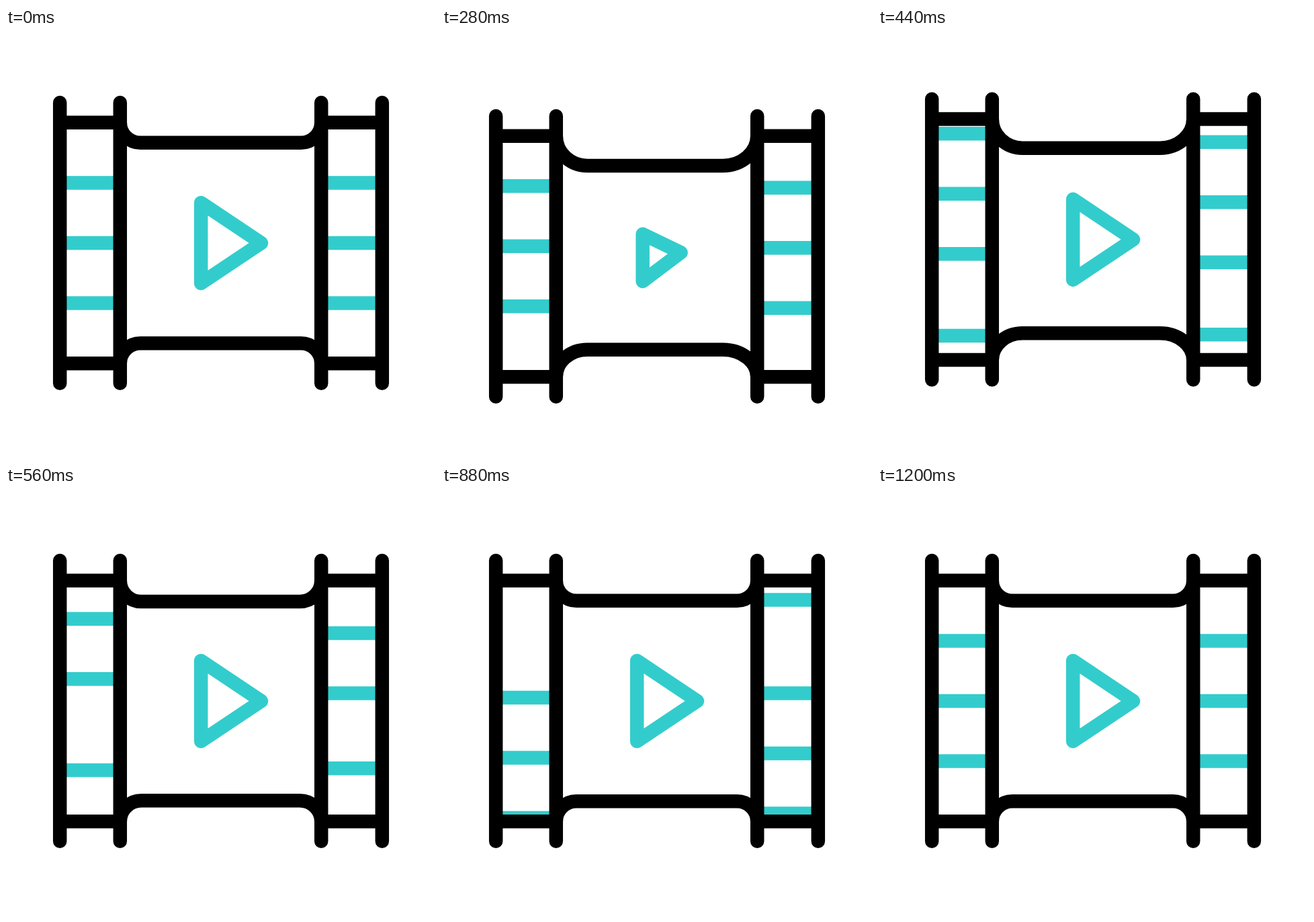
These frames come from a looping animation (640 px wide and 640 px high, 1480 ms). An HTML page:

```html
<!DOCTYPE html>
<html lang="en">
<head>
<meta charset="utf-8">
<title>Film strip</title>
<style>
  html, body { margin: 0; width: 100%; height: 100%; overflow: hidden; background: #fff; }
  svg { display: block; width: 100vw; height: 100vh; }
  path { fill: none; stroke: #000; stroke-width: 20.5; }
  .teal { stroke: #3cc; }
  .round { stroke-linecap: round; stroke-linejoin: round; }
</style>
</head>
<body>
<svg viewBox="0 0 640 640">
  <defs>
    <clipPath id="windows"><path d="M80 141H170V499H80ZM469 141H560V499H469Z"/></clipPath>
  </defs>
  <g id="body">
    <path class="teal" id="bars" clip-path="url(#windows)"/>
    <path id="edges"/>
    <path d="M80.2 140.8H169.8M80.2 499.3H169.8M469.2 140.8H559.8M469.2 499.3H559.8"/>
    <path class="round" d="M80.2 111V528.8M169.8 111V528.8M469.2 111V528.8M559.8 111V528.8"/>
    <path class="teal round" id="play"/>
  </g>
</svg>
<script>
const LOOP = 1480, STEP = 40;
const $ = id => document.getElementById(id);

// 0 to 1 over a span of time; soft = 0 is linear, soft = 1 is a full ease in and out
function ramp(t, start, length, soft = 1) {
  const x = Math.min(1, Math.max(0, (t - start) / length));
  return x + soft * (x * x * (3 - 2 * x) - x);
}

// Three bars, one hole apart
const bars = (x, dy) =>
  [-1, 0, 1].map(i => `M${x} ${320 + 89.5 * i + dy}h91`).join("");

// Film edge curling in from the rails; dir points towards the middle
function edge(y, dir, ry, pinch) {
  const rl = 30 + 1.17 * pinch, rr = 30 + 1.5 * pinch;
  const sweep = dir > 0 ? 0 : 1;
  return `M169.8 ${y}A${rl} ${ry} 0 0 ${sweep} ${169.8 + rl} ${y + dir * ry}`
    + `H${469.2 - rr}A${rr} ${ry} 0 0 ${sweep} 469.2 ${y}`;
}

function draw(t) {
  // Dip, jump past the rest height, settle
  const lift = 20 * ramp(t, 120, 160) - 27 * ramp(t, 280, 120) + 7 * ramp(t, 400, 120);
  $("body").setAttribute("transform", `translate(0 ${lift})`);

  // On each side one set of bars leaves upwards while the next comes in from below
  $("bars").setAttribute("d",
    bars(80, -315 * ramp(t, 152, 960))
    + bars(80, 330 * (1 - ramp(t, 80, 1120, .34)))
    + bars(469, -342 * ramp(t, 146, 1150))
    + bars(469, 322 * (1 - ramp(t, 80, 1120, .5))));

  const pinch = 17.6 * (ramp(t, 80, 280) - ramp(t, 360, 240));
  $("edges").setAttribute("d",
    edge(140.8, 1, 30 + pinch, pinch) + edge(499.3, -1, 30 + .75 * pinch, pinch));

  const s = 1.54 * (ramp(t, 80, 200) - ramp(t, 280, 115));
  const left = 290.2 + 5.5 * s;
  $("play").setAttribute("d",
    `M${left} ${260 + 17.4 * s}L${380 - 15.8 * s} ${320 - 3.8 * s}L${left} ${380 - 14.9 * s}Z`);
}

function tick() {
  const t = performance.now() % LOOP;
  // The last set has arrived at 1200 ms; what is left of the loop is a rest pose
  draw(t < 1200 ? Math.floor(t / STEP) * STEP : 0);
  requestAnimationFrame(tick);
}
tick();
</script>
</body>
</html>
```
